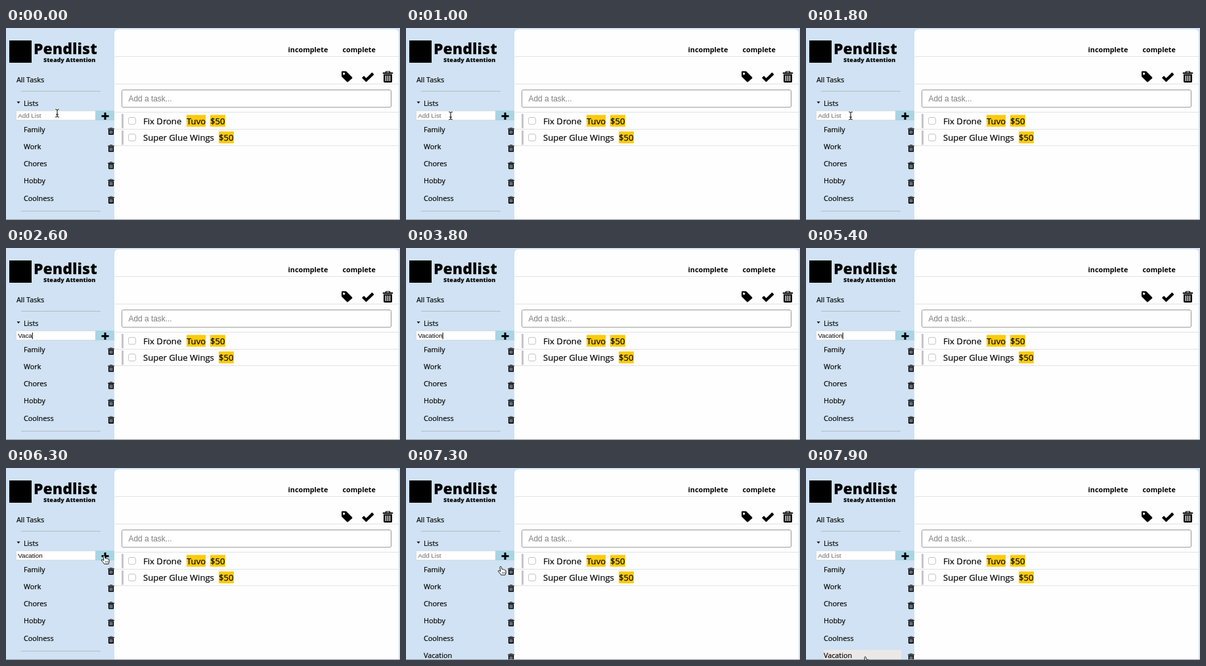
Recreate the animation shown at these times as an HTML page. Size 600x293 px, loop 8000 ms.

```html
<!DOCTYPE html>
<html lang="en">
<head>
<meta charset="utf-8">
<title>Task list</title>
<style>
  html, body { margin: 0; height: 100%; overflow: hidden; background: #d0e2f3; }
  svg { display: block; width: 100vw; height: 100vh; }
  text { font-family: "Open Sans", "Noto Sans", sans-serif; fill: #000; white-space: pre; }
  .brand { font-size: 23px; font-weight: 800; }
  .motto { font-size: 9px; font-weight: 800; }
  .nav, .task { stroke: #000; stroke-width: .2px; }
  .nav { font-size: 10.8px; }
  .tab { font-size: 10.8px; font-weight: 700; }
  .task { font-size: 13.1px; }
  .field { font-family: "Liberation Sans", Arial, sans-serif; font-size: 9.8px; }
  .hint { fill: #6c6c6c; }
  .big { font-size: 11.9px; fill: #7c7c7c; }
  .rule { stroke: #e2e2e6; }
  .divider { stroke: #b3bcc5; }
  .tag { fill: #fecb0c; }
</style>
</head>
<body>
<svg viewBox="0 0 600 293">
  <defs>
    <symbol id="trash" viewBox="0 0 16 18">
      <path d="M5 2.5V1.2Q5 .6 5.6 .6H10.4Q11 .6 11 1.2V2.5" fill="none" stroke="#000" stroke-width="1.3"/>
      <rect y="2.3" width="16" height="2" rx=".6"/>
      <path d="M1.5 5V16Q1.5 18 3.5 18H12.5Q14.5 18 14.5 16V5ZM4.300 7H5.700V15.500H4.300ZM7.300 7H8.700V15.500H7.300ZM10.300 7H11.700V15.500H10.300Z" fill-rule="evenodd"/>
    </symbol>
    <path id="bar" d="M-2.5 -6Q0 -6 0 -4.5Q0 -6 2.5 -6M0 -4.5V4.5M-2.5 6Q0 6 0 4.5Q0 6 2.5 6M-1.5 2H1.5"/>
  </defs>

  <rect width="600" height="293" fill="#d0e2f3"/>
  <rect x="5" y="19" width="34" height="34"/>
  <text class="brand" x="42" y="40">Pendlist</text>
  <text class="motto" x="57" y="52">Steady Attention</text>
  <text class="nav" x="16" y="82.5">All Tasks</text>
  <path class="divider" d="M23 96.5H144"/>
  <path d="M16.5 112.3H21.5L19 115.3Z"/>
  <text class="nav" x="27" y="118.5">Lists</text>

  <rect x="15.5" y="126.5" width="121" height="14" fill="#fff" stroke="#d9dde2"/>
  <text id="entry" class="field" x="18.2" y="137.2"></text>
  <rect id="caret" y="129" width="1" height="10"/>
  <rect x="136" y="126" width="30" height="15" fill="#a9d4e5"/>
  <path d="M145.5 134.5H156.5M151 129V140" stroke="#000" stroke-width="3"/>

  <rect id="hover" x="27" width="118" height="20" fill="#ece8e8"/>
  <g id="lists"></g>
  <path id="end" class="divider" d="M23 279.5H144"/>

  <path d="M165 293V9Q165 2 172 2H592Q598 2 598 8V293Z" fill="#fefefe"/>
  <text class="tab" x="429.5" y="37">incomplete</text>
  <text class="tab" x="512.5" y="37">complete</text>
  <path class="rule" d="M166 43.5H598M166 85.5H598M166 128.5H598M166 154.5H598M166 179.5H598"/>
  <path d="M512 66H518L527 75Q528 76 527 77L521 82Q520 83 519 82L511 74V67Q511 66 512 66ZM514.5 68A1.7 1.7 0 1 0 514.6 68Z" fill-rule="evenodd"/>
  <path d="M543.5 74.5L548.5 79.5L559 69.300" fill="none" stroke="#000" stroke-width="4.4"/>
  <use href="#trash" x="573.5" y="65.5" width="16" height="18"/>

  <rect x="176.5" y="94.5" width="410" height="26.5" rx="2" fill="#fff" stroke="#959595"/>
  <text class="field big" x="186.5" y="112">Add a task...</text>
  <g id="tasks"></g>
  <path d="M0 292.5H600" stroke="#8d9298"/>

  <g id="beam" fill="none" stroke-linecap="round">
    <use href="#bar" stroke="#fff" stroke-width="2.4"/>
    <use href="#bar" stroke="#000"/>
  </g>
  <g id="hand" fill="#fff" stroke="#000" stroke-width=".9" stroke-linejoin="round">
    <path d="M-1 1Q-1 -.4 .2 -.4Q1.2 -.4 1.4 .8L2.2 4Q3.5 3.3 4.2 4.4Q5.5 3.9 6.2 5Q7.8 4.8 8 6.5V9.5L7 12.5H.8L-1.5 9.5L-3.6 7Q-3.8 5.5 -2.3 5.8L0 7.2Z"/>
    <path d="M2.5 8V10.5M4.3 8V10.5M6 8V10.5" stroke-width=".6"/>
  </g>
</svg>
<script>
const $ = id => document.getElementById(id);
const LOOP = 8000, STEP = 100, PITCH = 26.2;
const WORD = "Vacation", HINT = "Add List";
const KEYS = [1900, 2100, 2300, 2500, 2800, 3000, 3200, 3400];
const FOCUS = 1300, CLICK = 6700;

// Pointer stops: time, x, y
const PATH = [
  [0, 78, 130], [300, 78, 130], [900, 68, 134], [5500, 68, 134],
  [6300, 149, 134], [7000, 149, 134], [7300, 144, 150.7], [7900, 90, 288.5]
];

const names = ["Family", "Work", "Chores", "Hobby", "Coolness", WORD];
$("lists").innerHTML = names.map((name, i) => `
  <g transform="translate(0 ${i * PITCH})">
    <text class="nav" x="27" y="158.900">${name}</text>
    <use href="#trash" x="155" y="151.700" width="10" height="11.500"/>
  </g>`).join("");
const added = $("lists").lastElementChild;

// Each tag: label, x, width
const tasks = [
  ["Fix Drone", [["Tuvo", 275, 29], ["$50", 311, 23]]],
  ["Super Glue Wings", [["$50", 324, 23]]]
];
$("tasks").innerHTML = tasks.map(([title, tags], i) => `
  <g transform="translate(0 ${i * 25.3})">
    <rect x="176" y="131" width="3" height="22" fill="#c6c6c6"/>
    <rect x="186.5" y="136.5" width="11" height="10.5" rx="2.5" fill="#fff" stroke="#c4c4c4"/>
    <text class="task" x="209" y="146.5">${title}</text>
    ${tags.map(([label, x, w]) => `<rect class="tag" x="${x}" y="132.6" width="${w}" height="18"/>
    <text class="task" x="${x}" y="146.5">${label}</text>`).join("")}
  </g>`).join("");

const show = (el, on) => { el.style.display = on ? "" : "none"; };

function pointer(t) {
  const i = PATH.findIndex(p => p[0] > t);
  if (i < 0) return PATH[PATH.length - 1].slice(1);
  const [t0, x0, y0] = PATH[i - 1], [t1, x1, y1] = PATH[i];
  const u = (t - t0) / (t1 - t0), e = u * u * (3 - 2 * u);
  return [x0 + (x1 - x0) * e, y0 + (y1 - y0) * e];
}

function draw(t) {
  const done = t >= CLICK;
  const pressed = KEYS.filter(k => k <= t);
  const typed = done ? "" : WORD.slice(0, pressed.length);
  const entry = $("entry");
  entry.textContent = typed || HINT;
  entry.classList.toggle("hint", !typed);

  // The blink restarts with every key
  const since = t - Math.max(FOCUS, ...pressed);
  show($("caret"), since >= 0 && t < 6400 && since % 1000 < 500);
  $("caret").setAttribute("x", 18.2 + (typed ? entry.getComputedTextLength() : 0));

  const [x, y] = pointer(t);
  const visible = t < KEYS[0] || t > 5500;
  const onButton = x > 136 || t > 7000;
  show($("beam"), visible && !onButton);
  show($("hand"), visible && onButton);
  for (const id of ["beam", "hand"]) $(id).setAttribute("transform", `translate(${x} ${y})`);

  const row = Math.floor((y - 151) / PITCH);
  show($("hover"), row >= 0);
  $("hover").setAttribute("y", 146.6 + row * PITCH);
  show(added, done);
  show($("end"), !done);
}

function tick() {
  draw(Math.floor(performance.now() % LOOP / STEP) * STEP);
  requestAnimationFrame(tick);
}
tick();
</script>
</body>
</html>
```
